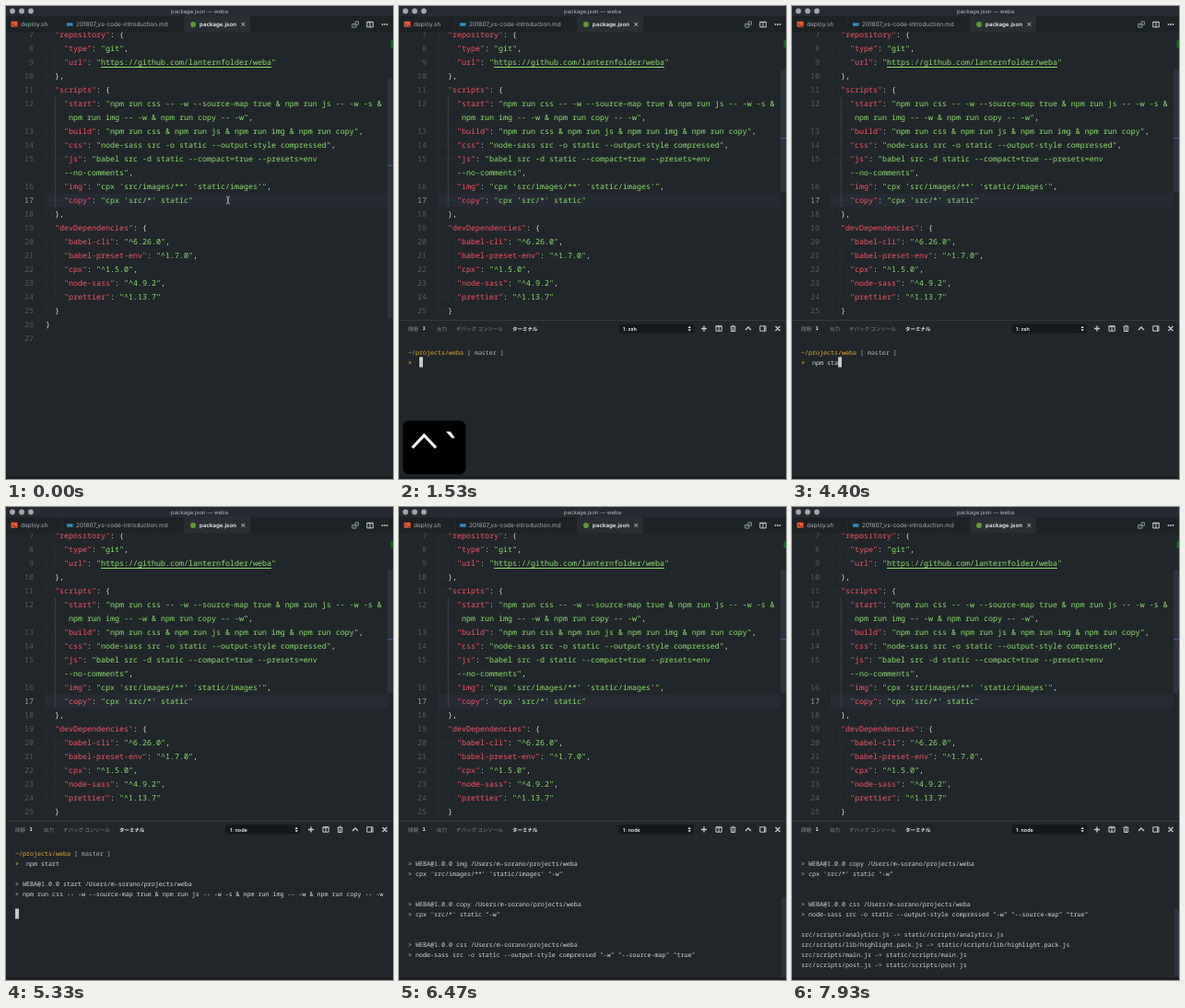
Recreate the animation shown at these times as an HTML page. Size 420 by 514 pixels, loop 8 s.

```html
<!DOCTYPE html>
<html lang="en">
<head>
<meta charset="utf-8">
<title>Editor and terminal</title>
<style>
  html, body { margin: 0; width: 100%; height: 100%; overflow: hidden; background: #21262a; }
  svg { display: block; width: 420px; height: 514px; }
  text { white-space: pre; text-rendering: geometricPrecision; }
  .code { font: 500 8.333px "Noto Sans Mono", monospace; fill: #d5dade; }
  .term { font: 500 6.667px "Noto Sans Mono", monospace; fill: #d8dcdf; }
  .ui { font: 6.45px Inter, sans-serif; fill: #a9afb3; }
  .jp { font: 5.5px "Noto Sans CJK JP", "Noto Sans CJK", sans-serif; fill: #8d9498; }
  .on { fill: #f2f4f5; font-weight: 600; }
  .key { fill: #ff5468; }
  .str { fill: #8ce36c; }
  .dots { fill: #3c4349; }
  .num { fill: #545c63; text-anchor: end; font-weight: 400; }
  .num.now { fill: #9aa1a7; }
  .path { fill: #eeab2b; }
  .prompt { fill: #f5a623; font-weight: 700; }
  .dim { fill: #b0b5b9; }
  .icon { fill: none; stroke: #c9ced1; }
  .slider { fill: #2e333d; }
</style>
</head>
<body>
<svg viewBox="0 0 420 514">
  <rect width="420" height="514" fill="#21262a"/>
  <rect x="42" y="203.5" width="372" height="15" fill="#252a33"/>
  <g id="guides" stroke="#2d3338" stroke-width=".6"></g>
  <path d="M53.3 98.5V218.5" stroke="#4a5158" stroke-width=".6"/>
  <g id="code" class="code"></g>
  <path d="M103 66.5H288" stroke="#8ce36c"/>
  <path id="pointer" class="icon" stroke-width=".7" d="M239 207q2 0 2 1.500v5q0 1.500-2 1.500M243 207q-2 0-2 1.500v5q0 1.500 2 1.500"/>
  <rect id="editorSlider" class="slider" x="414" width="6"/>
  <rect id="rulerMark" x="414" width="6" height="1" fill="#44699a"/>
  <rect x="417.5" y="37" width="2.5" height="8" fill="#0f6a1c"/>

  <rect width="420" height="11" fill="#262a32"/>
  <g fill="#a4a6a9"><circle cx="7" cy="5.5" r="2.9"/><circle cx="17" cy="5.5" r="2.9"/><circle cx="27" cy="5.5" r="2.9"/></g>
  <text class="ui" style="font-size:5.95px;fill:#b9bcbf" x="210" y="7.8" text-anchor="middle">package.json — weba</text>
  <rect y="11" width="420" height="17.5" fill="#1d2225"/>
  <rect x="193.5" y="11" width="71.5" height="17.5" fill="#292e33"/>
  <path d="M60.5 11V28.5M193.5 11V28.5" stroke="#2a2f33" stroke-width=".6"/>
  <rect x="5.5" y="16.8" width="7" height="6" rx=".8" fill="#ee5a36"/>
  <path d="M7 19l1.3 1.2-1.3 1.2M9.3 21.5h2" fill="none" stroke="#1d2225" stroke-width=".8"/>
  <text class="ui" x="16" y="22.3">deploy.sh</text>
  <rect x="66" y="18.3" width="6.5" height="3.4" fill="#2f8fc4"/>
  <text class="ui" x="76" y="22.3">201807_vs-code-introduction.md</text>
  <circle cx="203" cy="20" r="3" fill="#5f9a33"/>
  <text class="ui on" style="font-size:6.15px" x="210" y="22.3">package.json</text>
  <path class="icon" d="M255.5 18l3.8 3.8m0-3.8l-3.8 3.8"/>
  <path class="icon" style="stroke:#8fa9b5" stroke-width=".9" d="M378 19.500h-2.300v3.600h4.300v-2M379 16.900h3.400v3.300h-3.400zM377.500 21.300l2.500-2.300"/>
  <path class="icon" d="M391.800 17.300h6.500v5.600h-6.500zM395 17v6M391.800 17.600h6.500"/>
  <g fill="#c9ced1"><circle cx="408.5" cy="20" r=".9"/><circle cx="411" cy="20" r=".9"/><circle cx="413.5" cy="20" r=".9"/></g>

  <g id="panel">
    <rect y="341" width="420" height="173" fill="#21262a"/>
    <path d="M0 341.5H420" stroke="#343a3f"/>
    <g class="jp">
      <text x="10" y="352.5">問題</text>
      <text class="on" x="25.5" y="352.3">1</text>
      <text x="41" y="352.5">出力</text>
      <text x="62" y="352.5">デバッグ コンソール</text>
      <text class="on" x="123" y="352.5">ターミナル</text>
    </g>
    <rect x="238.5" y="345.5" width="81" height="10" rx="1" fill="#14181a"/>
    <text id="shell" class="ui on" style="font-size:5.5px" x="243" y="352.5"></text>
    <path d="M313.5 350l1.7-2.3 1.7 2.3zM313.5 351.2l1.7 2.3 1.7-2.3z" fill="#e2e5e7"/>
    <path class="icon" stroke-width="1.3" d="M328 350.5h6M331 347.5v6M376 352l3-3 3 3M408.5 348l5 5m0-5l-5 5"/>
    <path class="icon" d="M344 347.8h6.2v5.4h-6.2zM347.1 347.8v5.4M344 348.2h6.2M391.8 347.8h6.2v5.4h-6.2zM396.6 348v5"/>
    <path class="icon" d="M360.5 349v4.5h4.2v-4.5M359.5 348.3h6M361.7 347.3h2M362.6 349.5v3.5"/>
    <rect id="termSlider" class="slider" x="415" width="5"/>
    <g id="lines" class="term"></g>
    <rect id="cursor" width="4" height="11" fill="#c5cacd"/>
  </g>
  <rect y="511" width="420" height="3" fill="#1c2023"/>

  <g id="keycast">
    <rect x="4" y="450.5" width="68.5" height="58.5" rx="7" fill="#000"/>
    <path d="M14.5 480L27.3 466.5L40 480" fill="none" stroke="#fff" stroke-width="3.2"/>
    <path d="M51 462.5h4.8l5 7h-3.4z" fill="#fff"/>
  </g>
</svg>
<script>
const LOOP = 8000;
const ROWS = 14;
const $ = id => document.getElementById(id);
const tag = (cls, s) => `<tspan class="${cls}">${esc(s)}</tspan>`;
function esc(s) {
  return s.replace(/&/g, '&amp;').replace(/</g, '&lt;').replace(/>/g, '&gt;');
}

// A leading "~" marks the continuation of a wrapped string.
const source = `  "repository": {
    "type": "git",
    "url": "https://github.com/lanternfolder/weba"
  },
  "scripts": {
    "start": "npm run css -- -w --source-map true & npm run js -- -w -s &
~ npm run img -- -w & npm run copy -- -w",
    "build": "npm run css & npm run js & npm run img & npm run copy",
    "css": "node-sass src -o static --output-style compressed",
    "js": "babel src -d static --compact=true --presets=env
~--no-comments",
    "img": "cpx 'src/images/**' 'static/images'",
    "copy": "cpx 'src/*' static"
  },
  "devDependencies": {
    "babel-cli": "^6.26.0",
    "babel-preset-env": "^1.7.0",
    "cpx": "^1.5.0",
    "node-sass": "^4.9.2",
    "prettier": "^1.13.7"
  }
}
`.split('\n');

function paint(text) {
  return text.replace(/"[^"]*"?|[^"]+/g, (part, at) => {
    if (part[0] !== '"') return esc(part);
    return tag(text[at + part.length] === ':' ? 'key' : 'str', part);
  });
}

function buildEditor() {
  let number = 7, code = '', guides = '';
  source.forEach((row, i) => {
    const y = 34 + i * 15, top = y - 10.5;
    const wrapped = row[0] === '~';
    const indent = wrapped ? 4 : row.search(/\S|$/);
    let body;
    if (wrapped) {
      const end = row.lastIndexOf('"') + 1;
      body = tag('str', row.slice(1, end)) + esc(row.slice(end));
    } else {
      code += `<text class="num${number === 17 ? ' now' : ''}" x="30" y="${y}">${number}</text>`;
      code += `<text class="dots" x="43" y="${y}">${'·'.repeat(indent)}</text>`;
      body = paint(row.slice(indent));
      number++;
    }
    code += `<text x="${43 + indent * 5}" y="${y}">${body}</text>`;
    for (let x = 43.3; x < 43 + indent * 5; x += 10) guides += `<path d="M${x} ${top}v15"/>`;
  });
  $('code').innerHTML = code;
  $('guides').innerHTML = guides;
}

const npm = (script, command) =>
  ['', `> WEBA@1.0.0 ${script} /Users/m-sorano/projects/weba`, `> ${command}`, ''];
const built = file => [`src/scripts/${file} -> static/scripts/${file}`];

const output = [
  [5270, npm('start', 'npm run css -- -w --source-map true & npm run js -- -w -s & npm run img -- -w & npm run copy -- -w')],
  [5800, npm('js', 'babel src -d static --compact=true --presets=env --no-comments "-w" "-s"')],
  [5870, npm('img', `cpx 'src/images/**' 'static/images' "-w"`)],
  [5930, npm('copy', `cpx 'src/*' static "-w"`)],
  [6200, npm('css', 'node-sass src -o static --output-style compressed "-w" "--source-map" "true"')],
  [7060, built('analytics.js')],
  [7330, built('lib/highlight.pack.js')],
  [7460, built('main.js')],
  [7530, built('post.js')]
];

const command = 'npm start';
const typedAt = t => Math.max(0, Math.min(command.length, Math.floor((t - 3250) / 190) + 1));

function terminalLines(t) {
  if (t < 1330) return [''];
  const lines = ['', '~/projects/weba [ master ]', '>  ' + command.slice(0, typedAt(t))];
  if (t < 5130) return lines;
  for (const [time, block] of output) if (t >= time) lines.push(...block);
  return [...lines, ''];
}

function paintTerminal(line, index) {
  if (index === 1) return tag('path', line.slice(0, 15)) + tag('dim', line.slice(15));
  if (index === 2) return tag('prompt', '>') + esc(line.slice(1));
  return esc(line);
}

function drawTerminal(lines) {
  const scroll = Math.max(0, lines.length - ROWS);
  $('lines').innerHTML = lines.slice(scroll).map((line, row) =>
    `<text x="10" y="${367.8 + row * 11}">${paintTerminal(line, row + scroll)}</text>`).join('');
  const last = lines.length - 1;
  $('cursor').setAttribute('x', 10 + lines[last].length * 4);
  $('cursor').setAttribute('y', 359.5 + last * 11);
  show('cursor', !scroll);
  show('termSlider', scroll);
  $('termSlider').setAttribute('y', 360 + 154 * scroll / lines.length);
  $('termSlider').setAttribute('height', 154 * ROWS / lines.length);
}

function drawScrollbar(view) {
  const scale = view / (420 + view);
  $('editorSlider').setAttribute('y', 28 + 94.5 * scale);
  $('editorSlider').setAttribute('height', view * scale);
  $('rulerMark').setAttribute('y', 28 + 270 * scale);
}

function show(id, visible) {
  $(id).style.display = visible ? '' : 'none';
}

let shown = null;
function render(t) {
  const open = t >= 1130;
  show('pointer', t < 1000);
  show('panel', open);
  show('keycast', t >= 1000 && t < 2530);
  $('keycast').style.opacity = Math.min(1, (2530 - t) / 260);
  drawScrollbar(open ? 313 : 486);
  $('shell').textContent = t < 5270 ? '1: zsh' : '1: node';
  const lines = terminalLines(t), state = lines.join('\n');
  if (state !== shown) drawTerminal(lines);
  shown = state;
}

buildEditor();
const start = performance.now();
function tick() {
  render((performance.now() - start) % LOOP);
  requestAnimationFrame(tick);
}
tick();
</script>
</body>
</html>
```
